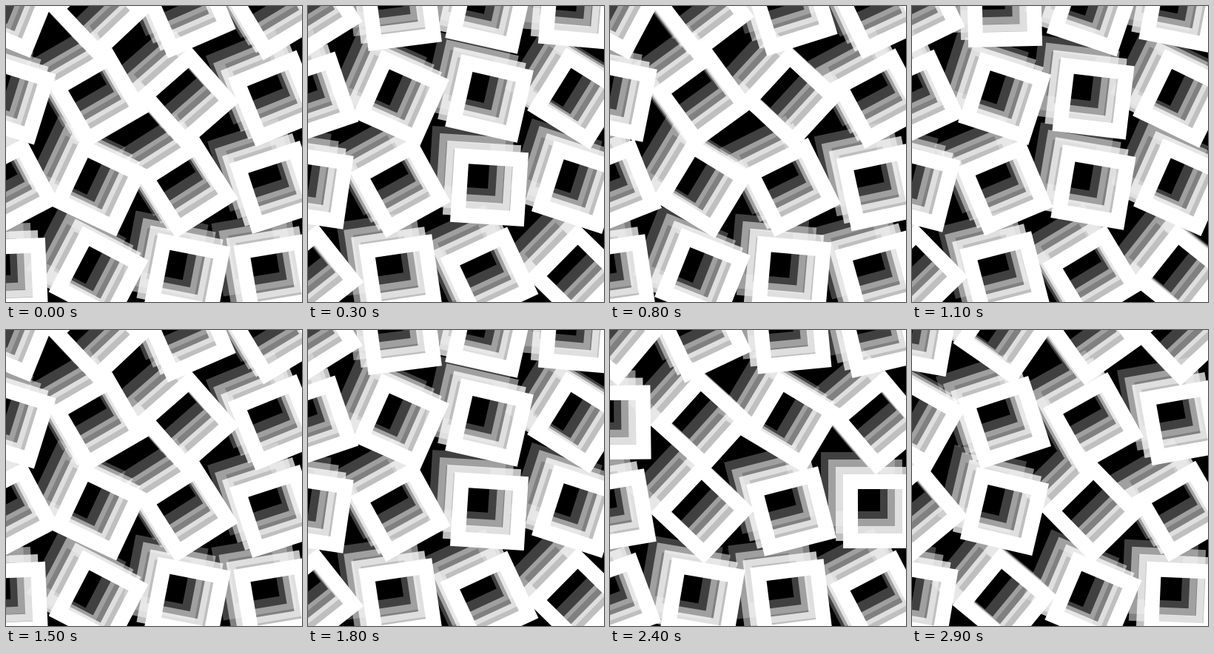
An HTML page with a canvas for the animation above (3 s loop, 400 by 400 pixels).

```html
<!DOCTYPE html>
<html lang="en">
<head>
<meta charset="utf-8">
<title>Turning frames</title>
<style>
  html, body { margin: 0; width: 100%; height: 100%; overflow: hidden; background: #000; }
  canvas { display: block; width: 400px; height: 400px; }
</style>
</head>
<body>
<canvas id="stage" width="400" height="400"></canvas>
<script>
const ctx = document.getElementById('stage').getContext('2d');

const STEP_MS = 100;
const STEPS = 15;
const TURN = 12; // degrees per step, rows alternate direction
const PITCH = 120;
const FIRST = 5;
const ECHOES = 4;
const SHIFT = 10;

// Starting angle of each square, row by row
const START = [
  [22, 46.7, 66.6, 59],
  [17.3, 59.9, 48.8, 67.9],
  [62.3, 25.2, 57.6, 71.9],
  [87.6, 27.6, 11, 80.5]
];

function drawSquare(x, y, deg) {
  ctx.save();
  ctx.translate(x, y);
  ctx.rotate(deg * Math.PI / 180);
  ctx.strokeRect(-40, -40, 80, 80);
  ctx.restore();
}

function draw(step) {
  ctx.fillStyle = '#000';
  ctx.fillRect(0, 0, 400, 400);
  ctx.lineWidth = 20;
  for (let k = 1; k <= ECHOES; k++) {
    const off = FIRST - (ECHOES - k) * SHIFT;
    ctx.strokeStyle = `rgba(255, 255, 255, ${k / ECHOES})`;
    START.forEach((row, r) => {
      const dir = r % 2 ? -1 : 1;
      row.forEach((deg, c) => {
        drawSquare(off + c * PITCH, off + r * PITCH, deg + dir * TURN * step);
      });
    });
  }
}

const t0 = performance.now();
let shown = -1;

function tick() {
  const step = Math.floor((performance.now() - t0) / STEP_MS) % STEPS;
  if (step !== shown) draw(shown = step);
  requestAnimationFrame(tick);
}
tick();
</script>
</body>
</html>
```
